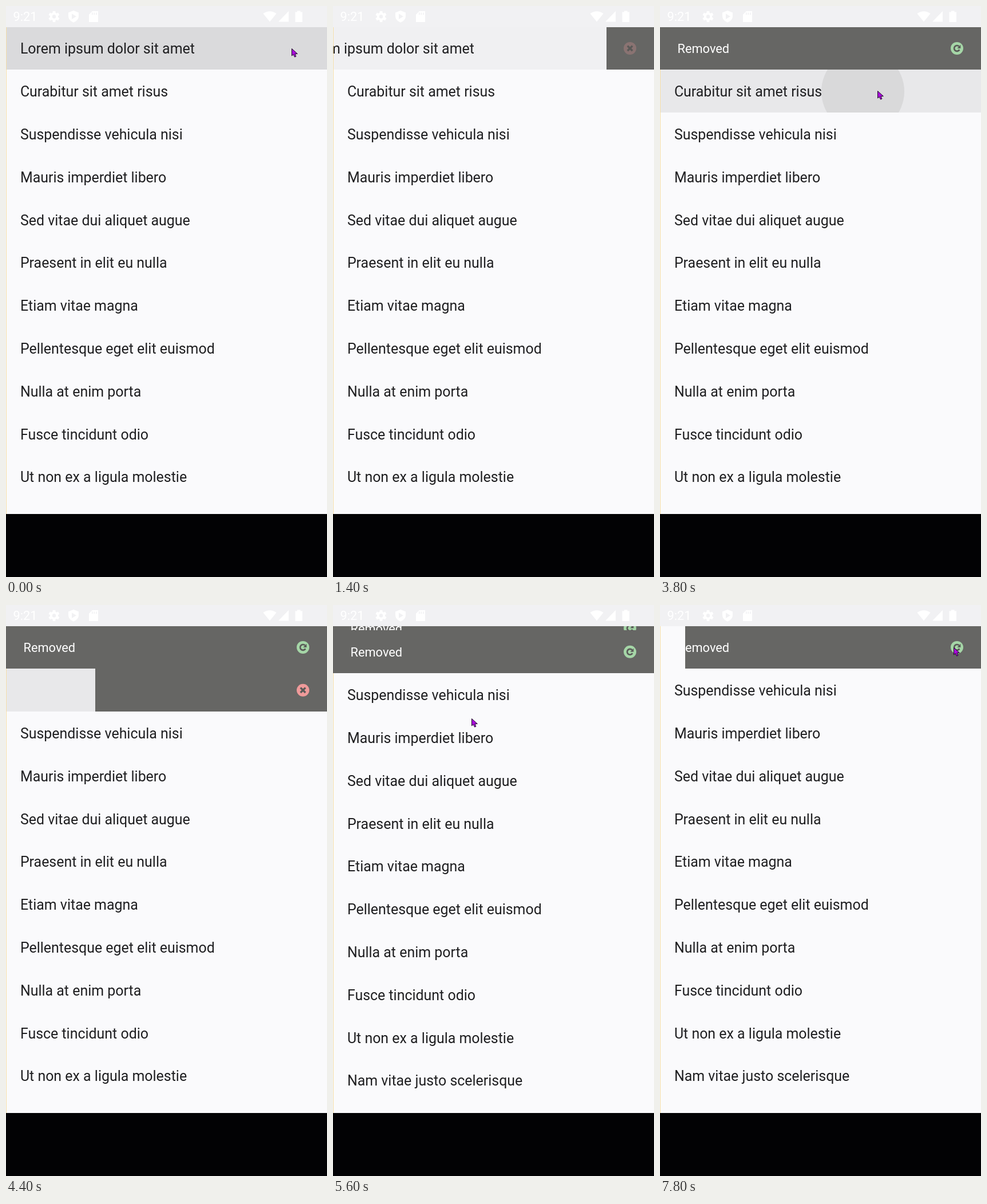
Write an HTML page with a canvas that moves like this. It is 561x997 px and loops after 8 s.

```html
<!DOCTYPE html>
<html lang="en">
<head>
<meta charset="utf-8">
<title>Swipe to remove</title>
<style>
html, body { margin: 0; width: 100%; height: 100%; overflow: hidden; background: #020204; }
canvas { display: block; width: 561px; height: 997px; }
</style>
</head>
<body>
<canvas id="stage" width="561" height="997"></canvas>
<script>
const ctx = document.getElementById('stage').getContext('2d');
const W = 561, H = 997, TOP = 37, BOTTOM = 887, ROW = 74.8;
const LOOP = 8000, TICK = 200;
const BASE = '#fafafc', PANEL = '#666664', BAR = '#f1f1f3', GLYPH = '#5a5a58';
const RED = [239, 154, 154], GREEN = [165, 214, 167];
const FONT = 'Roboto, sans-serif';

const items = [
  'Lorem ipsum dolor sit amet', 'Curabitur sit amet risus', 'Suspendisse vehicula nisi',
  'Mauris imperdiet libero', 'Sed vitae dui aliquet augue', 'Praesent in elit eu nulla',
  'Etiam vitae magna', 'Pellentesque eget elit euismod', 'Nulla at enim porta',
  'Fusce tincidunt odio', 'Ut non ex a ligula molestie', 'Nam vitae justo scelerisque'
];

const lerp = (a, b, p) => a + (b - a) * p;
const ramp = (t, from, to) => Math.min(1, Math.max(0, (t - from) / (to - from)));
const ease = (t, from, to) => Math.sin(ramp(t, from, to) * Math.PI / 2);

// Each swipe is held by the pointer (grip), then flung out of the row.
const swipes = [
  {
    fling: 1400,
    grip: t => 159 * ease(t, 0, 1000) - 76 * ramp(t, 1200, 1400),
    shade: t => lerp(0.128, 0.038, ramp(t, 0, 600))
  },
  {
    fling: 4200,
    undo: 7600,
    grip: t => 28 * ramp(t, 4000, 4200),
    shade: t => 0.07 * ramp(t, 3200, 3800) * (1 - ramp(t, 4600, 5000))
  }
];

function swipeOffset({ grip, fling, undo = LOOP }, t) {
  const out = lerp(grip(t), W, ease(t, fling, fling + 400));
  return out - 44 * ramp(t, undo, undo + 200);
}

const removal = ({ fling }, t) => ease(t, fling + 200, fling + 1000);

function pointerAt(t) {
  if (t <= 1200) return [499 - swipes[0].grip(t), 74];
  if (t >= 3200 && t <= 4200) {
    const p = ramp(t, 3200, 3600);
    return [lerp(466, 380, p) - swipes[1].grip(t), lerp(93, 148, p)];
  }
  if (t >= 5400) {
    const p = ramp(t, 5800, 7400);
    const bend = (a, b, c) => lerp(lerp(a, b, p), lerp(b, c, p), p);
    return [bend(242, 330, 513), bend(198, 198, 74)];
  }
}

function box(x, y, w, h, color) {
  ctx.fillStyle = color;
  ctx.fillRect(x, y, w, h);
}

function disc(x, y, r, color) {
  ctx.fillStyle = color;
  ctx.beginPath();
  ctx.arc(x, y, r, 0, Math.PI * 2);
  ctx.fill();
}

function shape(path, color) {
  ctx.fillStyle = color;
  ctx.fill(new Path2D(path));
}

function label(text, x, y, size, color) {
  ctx.font = `${size}px ${FONT}`;
  ctx.fillStyle = color;
  ctx.fillText(text, x, Math.round(y));
}

function clipped(x, y, w, h, draw) {
  ctx.save();
  ctx.beginPath();
  ctx.rect(x, y, w, h);
  ctx.clip();
  draw();
  ctx.restore();
}

function badge(y, offset, removed) {
  const color = RED.map((c, i) => Math.round(lerp(c, GREEN[i], removed)));
  ctx.save();
  ctx.translate(519, y);
  disc(0, 0, 11, `rgba(${color},${Math.min(1, offset / 310)})`);
  ctx.strokeStyle = GLYPH;
  if (removed > 0.2) {
    ctx.lineWidth = 2.7;
    ctx.beginPath();
    ctx.arc(0, 0, 4.9, 0.5, Math.PI * 2 - 0.75);
    ctx.stroke();
    shape('M6.4-6.2V0H.4z', GLYPH);
  } else {
    ctx.lineWidth = 3.4;
    ctx.stroke(new Path2D('M-4.3-4.3L4.3 4.3M4.3-4.3L-4.3 4.3'));
  }
  ctx.restore();
}

function drawRow(i, y, height, t) {
  const swipe = swipes[i];
  const offset = swipe ? swipeOffset(swipe, t) : 0;
  const edge = Math.round(W - offset);
  const top = Math.floor(y), h = Math.floor(y + height) - top;
  const mid = y + height / 2;
  if (edge < W) {
    clipped(edge, top, W - edge, h, () => {
      const removed = removal(swipe, t);
      box(edge, top, W - edge, h, PANEL);
      label('Removed', 30.5, mid + 8, 21.8, `rgba(255,255,255,${removed})`);
      badge(mid - 0.5, offset, removed);
    });
  }
  clipped(1, top, Math.max(0, edge - 1), h, () => {
    box(0, top, edge, h, BASE);
    if (swipe) box(0, top, edge, h, `rgba(0,0,0,${swipe.shade(t)})`);
    if (i === 1 && t >= 3600) {
      const fade = 0.068 * (1 - ramp(t, 4000, 4400));
      disc(354.5 - offset, mid, 72.5 * ((t - 3400) / 400) ** 2, `rgba(0,0,0,${fade})`);
    }
    label(items[i], 24.9 - offset, mid + 9, 24.93, '#1f1f21');
  });
}

function gear(x, y) {
  for (let i = 0; i < 6; i++) {
    ctx.save();
    ctx.translate(x, y);
    ctx.rotate(i * Math.PI / 3);
    box(-2.4, -9.6, 4.8, 5, '#fff');
    ctx.restore();
  }
  disc(x, y, 7.2, '#fff');
  disc(x, y, 3.2, BAR);
}

function statusBar() {
  box(0, 0, W, TOP, BAR);
  label('9:21', 12.5, 26, 21.8, '#fff');
  gear(84, 18.5);
  shape('M118 8l9 3.5v6c0 5-3.6 9.2-9 11.2c-5.4-2-9-6.2-9-11.2v-6z', '#fff');
  shape('M115 13.5l8 4.7l-8 4.8z', BAR);
  shape('M151 9h10v19h-16v-13z', '#fff');
  for (let x = 150; x < 160; x += 3.5) box(x, 11.5, 1.6, 4, BAR);
  shape('M461 27.5L449.5 13.2Q461 5.2 472.5 13.2z', '#fff');
  shape('M494 9v18.5h-18z', '#fff');
  shape('M505.5 10.5h3.5v-2h5.5v2h3.5v17.5h-12.5z', '#fff');
}

function cursor(x, y) {
  const arrow = 'M0 0V12.4L2.8 10L5 14.6L7.4 13.5L5.4 9.2L9.8 9z';
  ctx.save();
  ctx.translate(x + 0.5, y + 0.5);
  shape(arrow, '#ab0ade');
  ctx.strokeStyle = '#1c0824';
  ctx.lineWidth = 1;
  ctx.stroke(new Path2D(arrow));
  ctx.restore();
}

function draw(t) {
  box(0, 0, W, H, '#020204');
  box(0, TOP, W, BOTTOM - TOP, BASE);
  box(0, 0, 1, BOTTOM, '#f6dfa9');
  clipped(0, TOP, W, BOTTOM - TOP, () => {
    let y = TOP;
    items.forEach((_, i) => {
      // The first row folds away once its undo time is over.
      const height = i ? ROW : ROW * (1 - ease(t, 5400, 5684));
      if (height > 0) drawRow(i, y, height, t);
      y += height;
    });
  });
  statusBar();
  const tip = pointerAt(t);
  if (tip) cursor(...tip);
}

const start = performance.now();
function frame() {
  const t = (performance.now() - start) % LOOP;
  draw(Math.floor(t / TICK) * TICK);
  requestAnimationFrame(frame);
}
frame();
</script>
</body>
</html>
```
